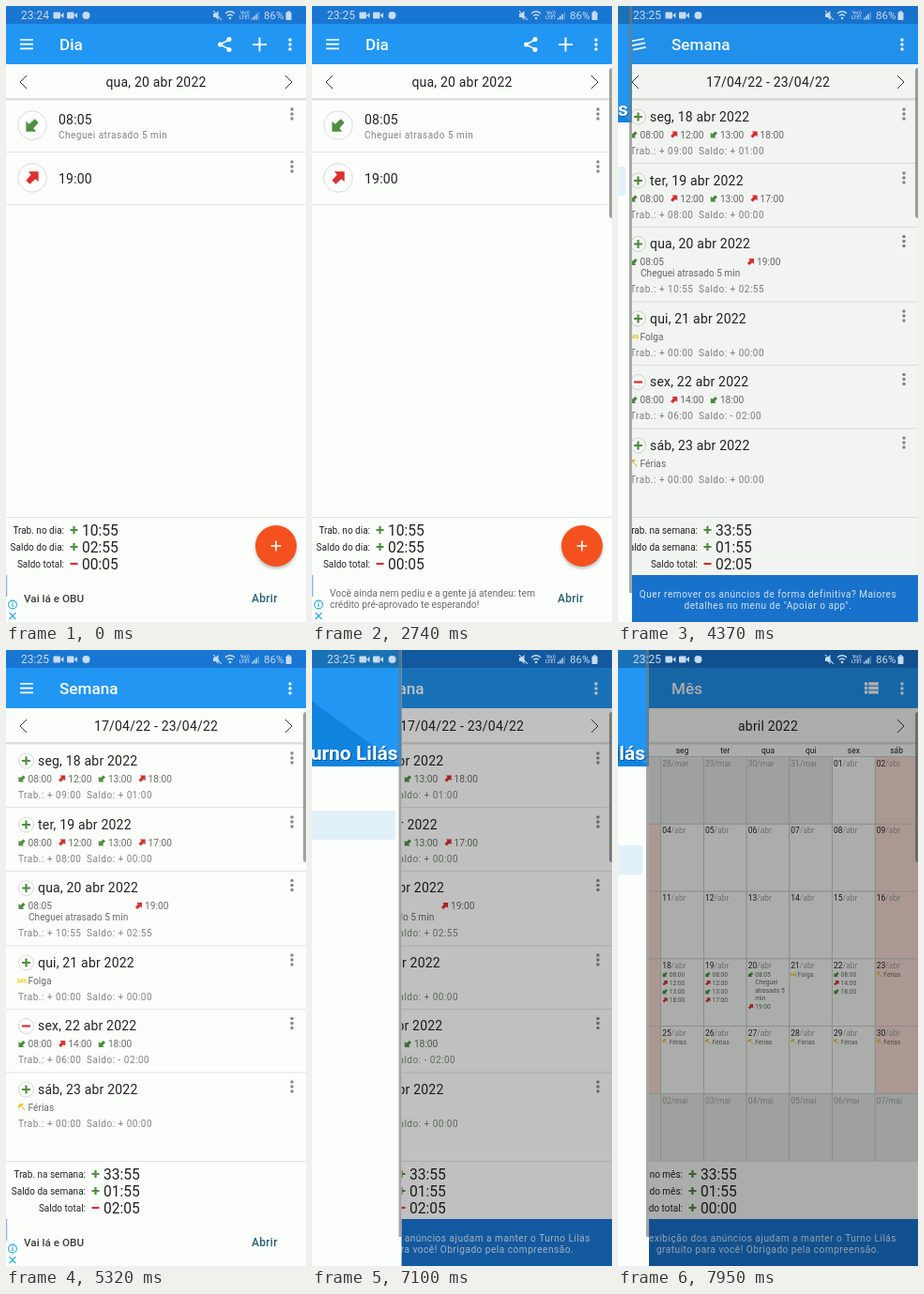
Recreate the animation shown at these times as an HTML page. Size 320 px wide and 656 px high, loop 8 s.

```html
<!DOCTYPE html>
<html lang="pt">
<head>
<meta charset="utf-8">
<style>
html, body { margin: 0; height: 100%; overflow: hidden; background: #fcfefc; }
svg { display: block; width: 100vw; height: 100vh; font-family: Roboto, sans-serif; }
text { white-space: pre; }
.item { color: #000; }
.item.on { color: #2196f3; }
</style>
</head>
<body>
<svg id="stage" viewBox="0 0 320 656"></svg>
<script>
const BLUE = '#2196f3', DEEP = '#1976d2', PAPER = '#fcfefc', GREEN = '#4f8f40', RED = '#dc3030';
const INK = '#222', GREY = '#808380', WIDTH = 237;

// ---- drawing helpers; text is placed by the middle of its capitals ----
const text = (x, y, s, size, fill = INK, more = '') =>
  `<text x="${x}" y="${(y + size * .356).toFixed(2)}" font-size="${size}" fill="${fill}" ${more}>${s}</text>`;
const rect = (x, y, w, h, fill, more = '') =>
  `<rect x="${x}" y="${y}" width="${w}" height="${h}" fill="${fill}" ${more}/>`;
const circle = (x, y, r, fill, more = '') => `<circle cx="${x}" cy="${y}" r="${r}" fill="${fill}" ${more}/>`;
const line = (d, color, w, more = '') => `<path d="${d}" fill="none" stroke="${color}" stroke-width="${w}" ${more}/>`;
const fill = (d, color) => `<path d="${d}" fill="${color}"/>`;
const at = (x, y, s, body) => `<g transform="translate(${x} ${y}) scale(${s})">${body}</g>`;
const group = (id, body) => `<g id="${id}">${body}</g>`;
const space = n => `letter-spacing="${n}"`;
const MID = 'text-anchor="middle"', END = 'text-anchor="end"', MEDIUM = 'font-weight="500"', BOLD = 'font-weight="700"';

const dots = (x, y, color = '#868886') => [-5, 0, 5].map(d => circle(x, y + d, 1.75, color)).join('');
const sign = (x, y, s, r = 4, w = 2.2) =>
  line(`M${x - r} ${y}h${2 * r}` + (s == '+' ? `M${x} ${y - r}v${2 * r}` : ''), s == '+' ? GREEN : RED, w);
const divider = y => rect(0, y, 320, 1, '#e2e5e2');

const arrow = (color, turn) =>
  `<path d="M-4-6.5H6.5V4L3.2 1.3L-2.6 6.5L-6.5 2.6L-1.3-3.2z" fill="${color}" transform="rotate(${turn})"/>`;
const marks = {
  '<': arrow(GREEN, 180),
  '>': arrow(RED, 0),
  '~': line('M-7-5V5M-7 2H7V5M7 2V-2H-1V2M-4-2v1', '#ecd93a', 2.4),
  '*': fill('M-7 2A7 7 0 0 1 4-6z', '#ecc52a') + line('M-1-2L6 6', '#d9a82a', 1.8),
  ' ': ''
};
const chip = (x, y, s, k, size, gap) =>
  at(x, y, k, marks[s[0]]) + text(x + gap, y, s.slice(1), size, '#686b68');

// ---- shared page parts ----
function frame(title, date, icons) {
  return rect(0, 0, 320, 656, PAPER) + rect(0, 0, 320, 19, DEEP) + rect(0, 19, 320, 43, BLUE) +
    text(57, 41, title, 17.1, '#fff', MEDIUM) + icons + dots(303, 41, '#fff') +
    text(160, 81, date, 14, INK, MID + space(.2)) +
    line('M22 74L15 81L22 88M298 74L305 81L298 88', '#222', .9) +
    rect(0, 98.5, 320, 1.2, '#c4c7c4') + rect(0, 99.7, 320, 1.3, '#eceeec');
}
function totals(edge, rows) {
  return divider(544) + rows.map(([label, s, value], i) => {
    const y = 558 + i * 18;
    return text(edge, y, label, 10, INK, END) + sign(edge + 10.5, y, s) + text(edge + 19, y, value, 15.6);
  }).join('');
}

// ---- day ----
const share = line('M238 36L228 41L238 46', '#fff', 1.5) +
  [[238, 35.5], [228.5, 41], [238, 46.5]].map(([x, y]) => circle(x, y, 2.5, '#fff')).join('');
const avatar = (y, kind) => circle(28, y, 15.3, '#fff', 'stroke="#d8dbd8"') + at(28, y, 1.02, marks[kind]);
const day = frame('Dia', 'qua, 20 abr 2022', share + line('M263 41h15M270.5 33.5v15', '#fff', 1.9)) +
  avatar(127, '<') + text(56, 121, '08:05', 14, INK, space(.2)) +
  text(56, 137, 'Cheguei atrasado 5 min', 10, GREY, space(.5)) + dots(305, 115) + divider(155) +
  avatar(183, '>') + text(56, 184, '19:00', 14, INK, space(.2)) + dots(305, 171) + divider(211) +
  totals(62, [['Trab. no dia:', '+', '10:55'], ['Saldo do dia:', '+', '02:55'], ['Saldo total:', '-', '00:05']]) +
  circle(288, 577, 22.5, '#000', 'opacity=".22" filter="url(#soft)"') +
  circle(288, 575, 22, '#f4511e') + line('M282.5 575h11M288 569.5v11', '#fff', 1.6);

// ---- week ----
const weekRows = [
  [118, 'seg, 18', ['<08:00', '>12:00', '<13:00', '>18:00'], '09:00', '+ 01:00'],
  [186, 'ter, 19', ['<08:00', '>12:00', '<13:00', '>17:00'], '08:00', '+ 00:00'],
  [253.5, 'qua, 20', ['<08:05', '>19:00'], '10:55', '+ 02:55', 'Cheguei atrasado 5 min'],
  [333, 'qui, 21', ['~Folga'], '00:00', '+ 00:00'],
  [400.5, 'sex, 22', ['<08:00', '>14:00', '<18:00'], '06:00', '- 02:00'],
  [468, 'sáb, 23', ['*Férias'], '00:00', '+ 00:00']
];
const week = frame('Semana', '17/04/22 - 23/04/22', '') +
  weekRows.map(([y, name, chips, work, balance, note], i) => {
    const low = y + (note ? 48 : 36);
    return circle(21.5, y, 8, '#fff', 'stroke="#d4d7d4"') + sign(21.5, y, balance[0], 4.5) +
      text(34, y, name + ' abr 2022', 14, INK, space(.2)) + dots(305, y - 3) +
      chips.map((c, j) => chip(17 + j * (note ? 124.5 : 42.7), y + 19, c, .55, 10.2, 6.5)).join('') +
      (note ? text(24, y + 31, note, 10.1, '#686b68') : '') +
      text(13, low, `Trab.: + ${work}`, 10, GREY, space(.5)) +
      text(86, low, `Saldo: ${balance}`, 10, GREY, space(.5)) + (i < 5 ? divider(low + 13) : '');
  }).join('') +
  totals(85, [['Trab. na semana:', '+', '33:55'], ['Saldo da semana:', '+', '01:55'], ['Saldo total:', '-', '02:05']]);

// ---- month ----
const events = { 20: ['<08:05', ' Cheguei', ' atrasado 5', ' min', '>19:00'] };
for (const [, name, chips, , , note] of weekRows) if (!note) events[name.slice(-2)] = chips;
for (let d = 24; d <= 30; d++) events[d] = ['*Férias'];
const COL = 320 / 7, ROW = 71.8;
function cell(i) {
  const c = i % 7, x = c * COL, top = 113.5 + (i / 7 | 0) * ROW, d = i - 4;
  const inside = d > 0 && d < 31, num = String(d < 1 ? d + 31 : d > 30 ? d - 30 : d).padStart(2, '0');
  const color = !inside ? '#e9ede9' : c % 6 ? PAPER : '#fbe0d8';
  let y = top + 7.5;
  return rect(x, top, COL, ROW, color, 'stroke="#c9ccc9" stroke-width=".8"') +
    text(x + 1.5, top + 7, `<tspan fill="${inside ? INK : '#a0a3a0'}">${num}</tspan>/${d < 1 ? 'mar' : inside ? 'abr' : 'mai'}`, 8.5, '#a0a3a0') +
    (inside && events[d] || []).map(e => chip(x + 4.5, y += e[0] == ' ' ? 8.4 : 9.1, e, .4, 6.7, 4.5)).join('');
}
const listIcon = [36, 40.5, 45].map(y => rect(263, y - 1.7, 3.2, 3.4, '#fff') + rect(267.3, y - 1.7, 10.5, 3.4, '#fff')).join('');
const month = frame('Mês', 'abril 2022', listIcon) +
  ['dom', 'seg', 'ter', 'qua', 'qui', 'sex', 'sáb'].map((n, i) => text((i + .5) * COL, 106.5, n, 8.5, INK, MID)).join('') +
  Array.from({ length: 42 }, (_, i) => cell(i)).join('') +
  totals(69, [['Trab. no mês:', '+', '33:55'], ['Saldo do mês:', '+', '01:55'], ['Saldo total:', '+', '00:00']]);

// ---- banners ----
const house = (a, b) => rect(0, 606, 320, 50, DEEP) +
  [a, b].map((s, i) => text(160, 626 + i * 12, s, 10.1, '#dcebfa', MID + space(.5))).join('');
const banner = rect(0, 606, 320, 50, PAPER) + rect(0, 606, 1.3, 23, '#8fb2f0') +
  circle(7, 637.5, 4.4, 'none', 'stroke="#22aadd" stroke-width="1.1"') +
  line('M7 636.6v3.4M7 634.6v1.1M3.6 646.2l6.8 6.8M10.4 646.2l-6.8 6.8', '#22aadd', 1.2) +
  group('headline', text(19, 631, 'Vai lá e OBU', 11.7, '#3c3f3c', MEDIUM)) +
  group('pitch', text(19, 625, 'Você ainda nem pediu e a gente já atendeu: tem', 10.3, '#6a6d6a') +
    text(19, 637, 'crédito pré-aprovado te esperando!', 10.3, '#6a6d6a')) +
  text(262, 631, 'Abrir', 12, '#2a6478', MEDIUM + space(.3));

// ---- drawer; icons live in a 24 unit box around its centre ----
const C = 'currentColor';
const ring = (r, w, more = '') => circle(0, 0, r, 'none', `stroke="${C}" stroke-width="${w}" ${more}`);
const calendar = inner => line('M-8-8H8V9H-8z', C, 2) + rect(-9, -9, 18, 5, C) + line('M-5-11v4M5-11v4', C, 2.4) + inner;
const dated = n => calendar(text(0, 3, n, 10, C, MID + BOLD));
const menu = [
  ['Dia', dated(1)], ['Semana', dated(7)], ['Mês', dated(31)],
  ['Especiais', calendar(circle(0, 2.5, 4.6, C))],
  ['Todos', line('M-6-9H10V6H-6zM-10-5V10H6M-2-1L1 2L6-4', C, 2) + rect(-7, -10, 18, 4, C)],
  ['Gráfico', line('M-9 11V4M-3 11V1M3 11V4M9 11V-3', C, 4) + line('M-11-1L-4-6L2-2L10-10', C, 2)],
  ['Inconsistências', [7, 10].map(r => ring(r, 1.5, `stroke-dasharray="${r * 2} 2"`)).join('') +
    ring(4.5, 1.4) + text(0, 0, '?', 8, C, MID + BOLD) + line('M4 4L11 11', C, 2)],
  ['Extrato', fill('M-8-10H3L8-5V10H-8z', C) + line('M-4 6L3-1M-2-2H4V4', PAPER, 2)],
  ['Backup', fill('M-9-9H5L9-5V9H-9z', C) + rect(-6, -7, 10, 4, PAPER) + circle(0, 4, 3, PAPER)],
  ['Configurações', ring(5.5, 5) + ring(9, 3.4, 'stroke-dasharray="5.2 4.225"')],
  ['NFC', line('M-10 5V-4L-3 4V-5M2-5Q5 0 2 5M6-8Q11 0 6 8', C, 2)],
  ['Apoiar o app', line('M-10-7H10V7H-10z', C, 2) + rect(-10, -4, 20, 4, C)],
  ['Ajuda', ring(10, 2) + line('M-3-2A3 3 0 1 1 1 1Q0 2 0 3M0 5v2', C, 2)],
  ['Sobre', ring(10, 2) + line('M0-1V6M0-5.5v2.2', C, 2)]
];
const rowY = i => 149.3 + i * 37.23;
const drawer = rect(0, 0, WIDTH, 656, PAPER) + rect(0, 0, WIDTH, 124, BLUE) +
  fill('M0 0H42L97 113L101 124H0z', '#f4511e') +
  fill('M34 0H50L102 30L97 113z', '#e6a817') +
  fill('M102 30L117 37L97 113z', '#f4511e') +
  fill('M117 37L146 58L97 113z', '#1976d2') +
  fill('M146 58L237 124H101L97 113z', '#0f84de') +
  circle(31, 62, 39, '#1b6ec0') + rect(0, 0, WIDTH, 19, '#000', 'opacity=".25"') +
  text(234, 111, 'Turno Lilás', 21, '#000', END + BOLD + ' opacity=".4"') +
  text(233, 109.5, 'Turno Lilás', 21, '#fff', END + BOLD) +
  rect(6.5, 0, 224, 31, '#e1f1fa', 'id="pill" rx="3"') +
  menu.map(([name, icon], i) => `<g class="item">${at(27, rowY(i), .68, icon)}${text(47, rowY(i), name, 12, C, MEDIUM)}</g>`).join('') +
  rect(234, 0, 3, 625, '#777', 'opacity=".65"');

// ---- system bar ----
const PALE = '#c8dbf0';
const camera = x => rect(x, 6.5, 7.5, 7, PALE, 'rx="1"') + fill(`M${x + 7.5} 10L${x + 11} 7V13z`, PALE);
const system = text(16, 10, '23:24', 12, PALE, 'id="clock"') + camera(50.5) + camera(65) + circle(85.5, 10, 4, PALE) +
  fill('M221 8h2.5l3-3v10l-3-3H221z', PALE) + line('M221 5l9 10', PALE, 1.1) +
  line('M234 8q5-4.5 10 0M236 10.5q3-2.5 6 0', PALE, 1.3) + circle(239, 13, 1.3, PALE) +
  text(250, 7, 'Vo))', 5.2, PALE, MEDIUM) + text(249, 12.5, 'LTE1', 5.2, PALE, MEDIUM) +
  [0, 1, 2, 3].map(i => rect(262 + i * 2.2, 12.5 - i * 2, 1.4, 2 + i * 2, PALE, i == 3 ? 'opacity=".4"' : '')).join('') +
  text(275, 10, '86%', 11.5, PALE) + rect(298.5, 6.5, 6, 8.5, PALE, 'rx="1"') + rect(300, 5.3, 3, 1.4, PALE);

const stage = document.getElementById('stage');
stage.innerHTML = '<defs><filter id="soft"><feGaussianBlur stdDeviation="1.6"/></filter></defs>' +
  group('day', day) + group('week', week) + group('month', month) +
  group('burger', line('M15 36h14M15 40.7h14M15 45.4h14', '#fff', 1.7)) +
  group('banner', banner) +
  group('house1', house('Quer remover os anúncios de forma definitiva? Maiores', 'detalhes no menu de "Apoiar o app".')) +
  group('house2', house('A exibição dos anúncios ajudam a manter o Turno Lilás', 'gratuito para você! Obrigado pela compreensão.')) +
  rect(317, 66, 6, 160, '#8f928f', 'id="handle" rx="3" opacity=".85"') +
  rect(0, 0, 320, 656, '#000', 'id="scrim"') + group('drawer', drawer) + system;

const $ = id => document.getElementById(id);
const show = (id, on) => $(id).style.display = on ? '' : 'none';
const clamp = v => Math.max(0, Math.min(1, v));
const settle = u => 1 - (1 - clamp(u)) ** 5;
const items = [...document.querySelectorAll('.item')];

function drawerEdge(t) {
  if (t < 3340) return 0;
  if (t < 4220) return WIDTH * settle((t - 3290) / 520);
  if (t < 4370) return 33;
  if (t < 4670) return 15 * (1 - (t - 4370) / 300) ** 2;
  if (t < 7100) return 0;
  return t < 7950 ? WIDTH * settle((t - 7050) / 520) : 33;
}

function draw(t) {
  const page = t < 4220 ? 0 : t < 7950 ? 1 : 2;
  ['day', 'week', 'month'].forEach((id, i) => show(id, i == page));

  const edge = drawerEdge(t), open = edge / WIDTH;
  const landing = t >= 4220 && t < 4370 || t >= 7950;
  $('drawer').setAttribute('transform', `translate(${edge - WIDTH} 0)`);
  $('scrim').setAttribute('opacity', landing ? .32 : .6 * open);
  $('burger').setAttribute('transform', `rotate(${-180 * open} 22 40.7)`);
  $('pill').setAttribute('y', rowY(page) - 15.5);
  items.forEach((el, i) => el.classList.toggle('on', i == page));

  const ad = t < 3340 || t >= 5320 && t < 7100;
  show('house1', !ad && t < 5320);
  show('house2', !ad && t > 5320);
  const swap = clamp(t < 4000 ? (t - 2110) / 630 : (t - 5500) / 620), p = swap * swap * (3 - 2 * swap);
  $('headline').setAttribute('transform', `translate(0 ${-14 * p})`);
  $('headline').setAttribute('opacity', clamp(1 - 2 * p));
  $('pitch').setAttribute('transform', `translate(0 ${14 * (1 - p)})`);
  $('pitch').setAttribute('opacity', clamp(2 * p - 1));

  show('handle', t >= 100);
  $('clock').textContent = t < 100 ? '23:24' : '23:25';
}

const start = performance.now();
(function tick() {
  draw((performance.now() - start) % 8000);
  requestAnimationFrame(tick);
})();
</script>
</body>
</html>
```
